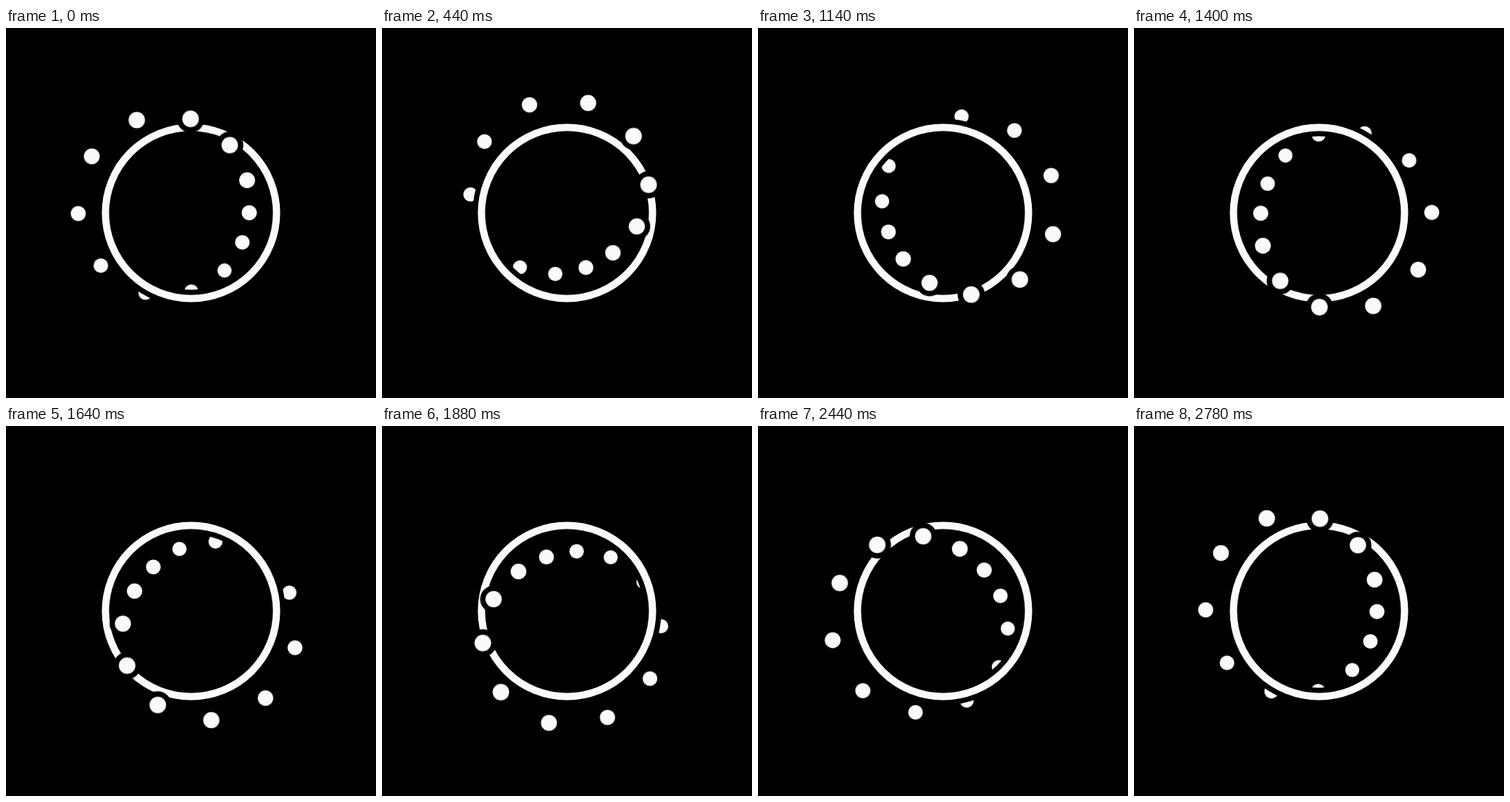
Recreate the animation shown at these times as an HTML page with a canvas. Size 500 by 500 pixels, loop 2800 ms.

```html
<!DOCTYPE html>
<html lang="en">
<head>
<meta charset="utf-8">
<title>Dots winding round a ring</title>
<style>
  html, body { margin: 0; width: 100%; height: 100%; overflow: hidden; background: #000; }
  canvas { display: block; width: 500px; height: 500px; }
</style>
</head>
<body>
<canvas id="stage" width="500" height="500"></canvas>
<script>
const SIZE = 500, LOOP = 2800, STEP = 20;
const DOTS = 12, RING = 115.6, TUBE = 37, DOT = 10.25, GAP = 6.7;
const DEPTH = 0.086;               // strength of the perspective
const SHUTTER = 0.6, SAMPLES = 5;  // motion blur within one step
const TAU = Math.PI * 2;
const INK = '#fafafa', PAPER = '#000';

const out = document.getElementById('stage').getContext('2d');
const layer = document.createElement('canvas');
layer.width = layer.height = SIZE;
const ctx = layer.getContext('2d');

function disc(x, y, r, color) {
  ctx.fillStyle = color;
  ctx.beginPath();
  ctx.arc(x, y, r, 0, TAU);
  ctx.fill();
}

function ring(width, color) {
  ctx.strokeStyle = color;
  ctx.lineWidth = width;
  ctx.beginPath();
  ctx.arc(0, 0, RING, 0, TAU);
  ctx.stroke();
}

// Each dot drifts back a third of a turn while winding round the tube.
function dotAt(i, t) {
  const angle = TAU * (i / DOTS - t / 3);
  const wind = angle - Math.PI - TAU * t;
  const z = Math.sin(wind);
  const scale = 1 / (1 - DEPTH * z);
  const r = (RING + TUBE * Math.cos(wind)) * scale;
  return { x: r * Math.cos(angle), y: r * Math.sin(angle), z, scale };
}

function drawScene(t) {
  ctx.setTransform(1, 0, 0, 1, 0, 0);
  ctx.fillStyle = PAPER;
  ctx.fillRect(0, 0, SIZE, SIZE);
  ctx.translate(SIZE / 2, SIZE / 2);

  const dots = Array.from({ length: DOTS }, (_, i) => dotAt(i, t));
  const front = dots.filter(d => d.z >= 0);
  const back = dots.filter(d => d.z < 0);
  const fill = d => disc(d.x, d.y, DOT * d.scale, INK);

  back.forEach(fill);
  ring(23.8, PAPER);
  ring(9.8, INK);
  front.forEach(d => disc(d.x, d.y, (DOT + GAP) * d.scale, PAPER));
  front.forEach(fill);
}

function render(ms) {
  const step = Math.floor((ms % LOOP) / STEP);
  for (let i = 0; i < SAMPLES; i++) {
    const shift = SHUTTER * (i + 0.5) / SAMPLES;
    drawScene((step + shift) * STEP / LOOP);
    out.globalAlpha = 1 / (i + 1);
    out.drawImage(layer, 0, 0);
  }
}

const start = performance.now();
function tick() {
  render(performance.now() - start);
  requestAnimationFrame(tick);
}
tick();
</script>
</body>
</html>
```
